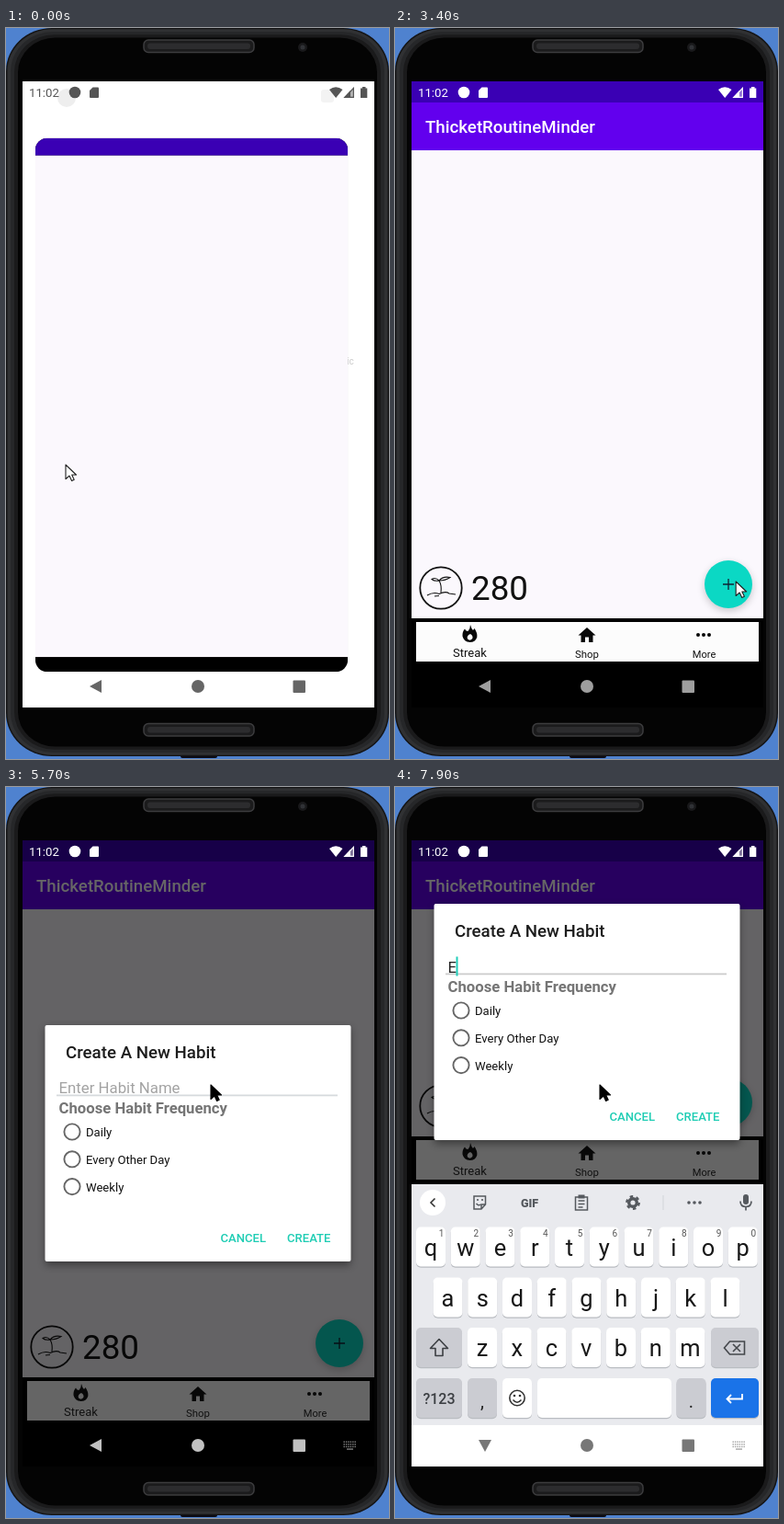
These frames come from a looping animation (417x795 px, 8 s). An HTML page:

```html
<!DOCTYPE html>
<html lang="en">
<head>
<meta charset="utf-8">
<title>Habit app</title>
<style>
html, body { margin: 0; width: 100%; height: 100%; overflow: hidden; background: #4f82cf; }
svg { display: block; width: 417px; height: 795px; font-family: Roboto, sans-serif; }
</style>
</head>
<body>
<svg id="stage" viewBox="0 0 417 795" xmlns="http://www.w3.org/2000/svg"></svg>
<script>
const LOOP = 8000;
const stage = document.getElementById('stage');

// Markup helpers
const rect = (x, y, w, h, fill, extra = '') =>
  `<rect x="${x}" y="${y}" width="${w}" height="${h}" fill="${fill}" ${extra}/>`;
const dot = (x, y, r, fill, extra = '') =>
  `<circle cx="${x}" cy="${y}" r="${r}" fill="${fill}" ${extra}/>`;
const text = (x, y, size, str, extra = '') =>
  `<text x="${x}" y="${y}" font-size="${size}" ${extra}>${str}</text>`;
const line = (d, color, width = 1.5, extra = '') =>
  `<path d="${d}" fill="none" stroke="${color}" stroke-width="${width}" ${extra}/>`;
const shape = (d, extra = '') => `<path d="${d}" ${extra}/>`;
const group = (id, body, extra = '') => `<g id="${id}" ${extra}>${body}</g>`;
const mid = 'text-anchor="middle"';
const dots = (x, y, gap, r, fill) => [-gap, 0, gap].map(d => dot(x + d, y, r, fill)).join('');

function speaker(y) {
  return rect(150, y, 120, 13.5, '#1b1b1c', 'rx="5" stroke="#3c3c3e" stroke-width="1.5"') +
    rect(154, y + 3.5, 112, 6.5, '#2c2c2e', 'rx="3"');
}

// One layer of the phone body, set in from its edge
const shell = (inset, fill) =>
  rect(inset, inset * .8, 417 - inset * 2, 792 - inset * 1.6, fill, `rx="${50 - inset * .7}" ry="${47 - inset * .7}"`);

function phone() {
  return rect(0, 0, 417, 795, '#4f82cf') +
    rect(190, 790, 40, 4, '#0b0b14', 'rx="2"') +
    shell(0, '#141415') + shell(1.5, '#303133') + shell(5, '#262729') +
    shell(9, '#1a1a1b') + shell(13, '#040404') +
    speaker(13) + speaker(756.5) +
    dot(323, 21, 5, '#19191b') + dot(323, 21, 2.5, '#303236');
}

function statusBar() {
  return text(25, 75, 13.2, '11:02') + dot(75, 70, 6.3) +
    shape('M94.5 64.5H100Q101 64.5 101 65.5V75Q101 76 100 76H92Q91 76 91 75V68Z') +
    shape('M352 67Q359 61.5 366.500 67L359.200 76Z') +
    shape('M379 64V76H367.500Z', 'fill-opacity=".45"') + shape('M375 68V76H367.500Z') +
    line('M378.400 65.500V75.400H369Z', 'currentColor', 1.1) +
    shape('M386 65.500H388V64H391.500V65.500H393.300V76H386Z');
}

function seedling() {
  return dot(50, 609, 22.7, 'none', 'stroke="#111" stroke-width="1.8"') +
    line('M35 617Q42 613 48 615.500Q55 612 59 615L66 616M43 618L48 617.500', '#111', 1.1) +
    line('M50 614Q51 606 48 601Q43 602 40 599.500Q44 597 48 601Q52 596 60 597.500Q55 601 48 601', '#111', 1.1);
}

function home() {
  return rect(18, 81, 383, 52, '#6200ee') +
    text(33, 114, 18.7, 'ThicketRoutineMinder', 'fill="#fff" font-weight="500"');
}

function lower() {
  return seedling() + text(83, 622, 36.8, '280', 'fill="#111"') +
    dot(363, 608, 26, '#000', 'opacity=".2" filter="url(#blur)"') +
    dot(363, 605, 26, '#0bd8c4') + line('M363 599V611M357 605H369', '#123', 1.3);
}

function tabs() {
  return rect(18, 642, 383, 52, '#000') + rect(23, 646, 373, 43, '#fdfbfe', 'id="panel"') +
    shape('M82 649Q83 653 85 655L86.500 653Q90 658 89.300 662.500Q87.500 668 81.500 668Q75 667.500 73.500 661.500Q73 657 76 653.500Q77 656 79.500 656Q82 653.500 82 649ZM82 659Q77.500 661 79 664.500Q81.500 667 84.300 664Q85.300 661 82 659Z',
      'fill="#080808" fill-rule="evenodd"') +
    shape('M209 652L218.500 660.500H215.500V668H211V662.500H207V668H202.500V660.500H199.500Z', 'fill="#080808"') +
    dots(336, 660, 6, 2, '#080808') +
    `<g fill="#111" ${mid}>` + text(81.5, 684, 13, 'Streak') + text(209, 685, 11.4, 'Shop') +
    text(336.5, 685, 11.1, 'More') + '</g>';
}

function dialog() {
  const options = ['Daily', 'Every Other Day', 'Weekly'].map((label, i) =>
    dot(72, 375 + i * 29.8, 8.6, 'none', 'stroke="#666" stroke-width="1.9"') +
    text(87, 380 + i * 29.8, 13.1, label, 'fill="#111"')).join('');
  return rect(43, 262, 332, 258, '#000', 'opacity=".4" filter="url(#blur)"') +
    rect(42.5, 259, 333, 257, '#fff', 'rx="2"') +
    text(65, 295, 18.7, 'Create A New Habit', 'fill="#1c1c1c" font-weight="500"') +
    rect(55, 334.5, 306, 1.8, '#ccc', 'id="rule"') +
    text(57.5, 333, 16.8, 'Enter Habit Name', 'id="hint" fill="#a3a3a3"') +
    text(57.5, 333.5, 16.8, 'E', 'id="typed" fill="#222"') +
    rect(57, 316.5, 2, 21, '#1fcdb9', 'id="caret"') +
    text(57.5, 355, 16.7, 'Choose Habit Frequency', 'fill="#757575" font-weight="700"') + options +
    `<g fill="#1fcdb4" font-weight="500">` + text(233.5, 495, 13.1, 'CANCEL') +
    text(306, 495, 13.1, 'CREATE') + '</g>';
}

const key = (x, y, w, fill = '#fff') =>
  rect(x, y + 1.2, w, 43, '#b9bcc1', 'rx="5"') + rect(x, y, w, 43, fill, 'rx="5"');

function letters(row, x0, y, digits) {
  return [...row].map((c, i) => {
    const x = x0 + i * 37.75;
    return key(x - 16, y, 32) +
      text(x, y + 31, 25.4, c, `class="letter" fill="#171717" ${mid}`) +
      (digits ? text(x + 11.5, y + 10.5, 10, (i + 1) % 10, `fill="#555" ${mid}`) : '');
  }).join('');
}

function toolbar() {
  const ink = '#55595e';
  return dot(41, 452, 14, '#fff') + line('M43.500 447.500L39 452L43.500 456.500', '#333', 1.6) +
    line('M86 445H98.500V454L94 459H86ZM94 459V454H98.500M88.500 453Q91 456 93 454', ink) +
    dot(90, 449, 1.1, ink) + dot(95, 449, 1.1, ink) +
    text(146.5, 456.5, 12.5, 'GIF', `fill="${ink}" font-weight="900" ${mid}`) +
    line('M196.500 446H209.500V460H196.500ZM199.500 450H206.500M199.500 453.500H206.500M199.500 457H204.500', ink) +
    rect(199.5, 443.5, 7, 4, ink) +
    dot(259, 452, 4.3, 'none', `stroke="${ink}" stroke-width="3.4"`) +
    dot(259, 452, 6.7, 'none', `stroke="${ink}" stroke-width="2.4" stroke-dasharray="3.500 3.516"`) +
    rect(291.5, 444, 1, 16, '#d2d4d8') + dots(326, 452, 6, 1.8, ink) +
    rect(379, 443, 6, 11, ink, 'rx="3"') +
    line('M376 450.500Q376 456.500 382 456.500T388 450.500M382 456.500V460.500', ink, 1.7);
}

function keyboard() {
  const gray = '#cbccd2';
  return rect(18, 432, 383, 263, '#e9eaee') + toolbar() +
    letters('QWERTYUIOP', 39, 478.5, true) + letters('ASDFGHJKL', 57.5, 533.5) +
    key(23, 588, 50, gray) + letters('ZXCVBNM', 95, 588) + key(344, 588, 52, gray) +
    shape('M48 600.500L57.500 610.500H52V618.500H44V610.500H38.500Z',
      'id="shift" stroke="#3c3f43" stroke-width="1.6" stroke-linejoin="round"') +
    line('M364.500 603H380.500V617H364.500L358.500 610ZM368 606L376 614M376 606L368 614', '#44474b', 1.6) +
    key(23, 643, 50, gray) + text(48, 671, 16, '?123', `fill="#3c3f43" font-weight="500" ${mid}`) +
    key(79, 643, 32, gray) + text(95, 675, 20, ',', `fill="#222" ${mid}`) +
    key(117, 643, 32) + dot(133, 664.5, 8.2, 'none', 'stroke="#333" stroke-width="1.6"') +
    dot(130, 662, 1.3, '#333') + dot(136, 662, 1.3, '#333') + line('M128.500 666.500Q133 672 137.500 666.500', '#333') +
    key(155, 643, 146) + key(306.5, 643, 32, gray) + text(322.5, 675, 20, '.', `fill="#222" ${mid}`) +
    key(344, 643, 52, '#1a73e8') +
    line('M378 660V665.500H361.500M366 661L361.500 665.500L366 670', '#fff', 1.8);
}

function navIcons() {
  const keys = [0, 1, 2].map(r => [0, 1, 2, 3, 4, 5].map(c =>
    rect(367.5 + c * 2.4, 711.5 + r * 2.6, 1.4, 1.5, 'currentColor')).join('')).join('');
  return shape('M91 716L104 709V723Z', 'id="back"') + dot(209, 716, 7, 'currentColor') +
    rect(312.5, 709.5, 13.5, 13.5, 'currentColor', 'rx="1"') +
    group('kbIcon', keys + rect(371, 719.4, 7, 1.4, 'currentColor'), 'opacity=".65"');
}

stage.innerHTML =
  `<defs><filter id="blur" x="-20%" y="-20%" width="140%" height="140%"><feGaussianBlur stdDeviation="4"/></filter>
  <clipPath id="screen"><rect x="18" y="58" width="383" height="681"/></clipPath>
  <clipPath id="above"><rect x="18" y="58" width="383" height="636"/></clipPath></defs>` + phone() +
  group('display',
    rect(18, 58, 383, 681, '#fff') +
    group('launcher', dot(66, 76, 10, '#eee') + rect(343, 67, 14, 14, '#f3f3f3', 'rx="3"') +
      text(371, 366, 10, 'ic', 'fill="#ccc"')) +
    group('window', rect(0, 0, 0, 0, '#000', 'id="base"') + rect(0, 0, 0, 0, '#3a00b4', 'id="head"') +
      rect(0, 0, 0, 0, '#fbf8fd', 'id="page"'), 'clip-path="url(#round)"') +
    '<clipPath id="round"><rect id="frame"/></clipPath>' +
    group('app', home() + group('lower', lower())) +
    rect(18, 58, 383, 636, '#000', 'id="scrim"') +
    group('tabs', tabs()) +
    group('status', statusBar(), 'fill="currentColor"') +
    group('dialog', dialog()) +
    '<g clip-path="url(#above)">' + group('keyboard', keyboard()) + '</g>' +
    rect(18, 694, 383, 45, '#fff', 'id="navBg"') + group('nav', navIcons(), 'fill="currentColor"'),
    'clip-path="url(#screen)"') +
  shape('M0 0V15.500L4 12L6.600 17.500L9.200 16.300L6.700 11H11.500Z', 'id="pointer" stroke-linejoin="round"');

const el = {};
stage.querySelectorAll('[id]').forEach(n => { el[n.id] = n; });
const keyCaps = [...stage.querySelectorAll('.letter')];
const set = (id, attrs) => { for (const k in attrs) el[id].setAttribute(k, attrs[k]); };
const show = (id, on) => set(id, { visibility: on ? 'visible' : 'hidden' });
const clamp = v => Math.max(0, Math.min(1, v));
const ramp = (t, a, b) => clamp((t - a) / (b - a));
const smooth = p => p * p * (3 - 2 * p);
const out = p => 1 - (1 - p) ** 2;
const mix = (a, b, p) => a + (b - a) * p;

// Pointer stops: time, x, y
const path = [[0, 65, 475], [700, 65, 475], [1500, 254, 462], [1700, 254, 462], [2800, 364, 600],
  [3300, 371, 602], [3700, 372, 602], [3900, 372, 602], [4800, 223, 324], [LOOP, 223, 324]];

function pointerAt(t) {
  const i = path.findIndex(p => p[0] > t);
  const a = path[i - 1], b = path[i], p = smooth(ramp(t, a[0], b[0]));
  return [mix(a[1], b[1], p), mix(a[2], b[2], p)];
}

function drawWindow(t) {
  const p = out(ramp(t, 0, 400));
  const x = mix(32, 18, p), y = mix(120, 58, p);
  const width = mix(372, 401, p) - x, height = mix(700, 739, p) - y;
  const top = mix(19, 23, p), foot = mix(16, 45, p);
  set('frame', { x, y, width, height, rx: mix(13, 0, p) });
  set('base', { x, y, width, height });
  set('head', { x, y, width, height: top });
  set('page', { x, y: y + top, width, height: height - top - foot });
  set('launcher', { opacity: 1 - p });
}

function draw(t) {
  drawWindow(t);
  const ready = t >= 1900, kb = t >= 6000, typed = t >= 7800;
  show('app', ready);
  show('tabs', ready);

  const fade = t < 3600 ? 0 : ramp(t, 3520, 3700);
  set('scrim', { opacity: .6 * fade });
  set('dialog', { opacity: fade });

  const shift = `translate(0 ${kb ? -262 : 0})`;
  set('lower', { transform: shift });
  set('tabs', { transform: shift });
  const tone = Math.round(mix(252, 101, fade));
  set('panel', { fill: `rgb(${tone},${tone},${tone})` });

  const rise = kb ? out(ramp(t, 5950, 6145)) : 0;
  set('dialog', { transform: `translate(0 ${mix(0, -132, rise)})` });
  show('keyboard', kb);
  set('keyboard', { transform: `translate(0 ${262 * (1 - out(ramp(t, 5930, 6100)))})` });
  show('navBg', kb);

  const caret = kb && (typed || (t - 6000) % 1000 < 500);
  show('caret', caret);
  set('caret', { x: typed ? 66.5 : 57 });
  show('hint', !typed);
  show('typed', typed);
  set('rule', { fill: t >= 5400 && !kb ? '#d6dadd' : '#ccc' });
  keyCaps.forEach(n => {
    const c = n.textContent;
    n.textContent = typed ? c.toLowerCase() : c.toUpperCase();
  });
  set('shift', { fill: typed ? 'none' : '#3c3f43' });

  set('status', { color: t < 250 ? '#555' : '#fff' });
  const navTone = t < 200 ? '#666' : kb ? '#777' : t >= 2800 && t < 3600 ? '#9e9e9e' : '#c1c1c1';
  set('nav', { color: navTone });
  set('back', { transform: `rotate(${-90 * smooth(ramp(t, 6100, 6300))} 98 716)` });
  show('kbIcon', t >= 5400);

  const [px, py] = pointerAt(t);
  const dark = (t >= 800 && t < 2800) || t >= 3900;
  set('pointer', {
    transform: `translate(${px} ${py})`,
    fill: dark ? '#000' : '#fff',
    stroke: dark ? '#000' : '#222',
    'stroke-width': 1.1
  });
}

const start = performance.now();
function tick() {
  draw((performance.now() - start) % LOOP);
  requestAnimationFrame(tick);
}
tick();
</script>
</body>
</html>
```
